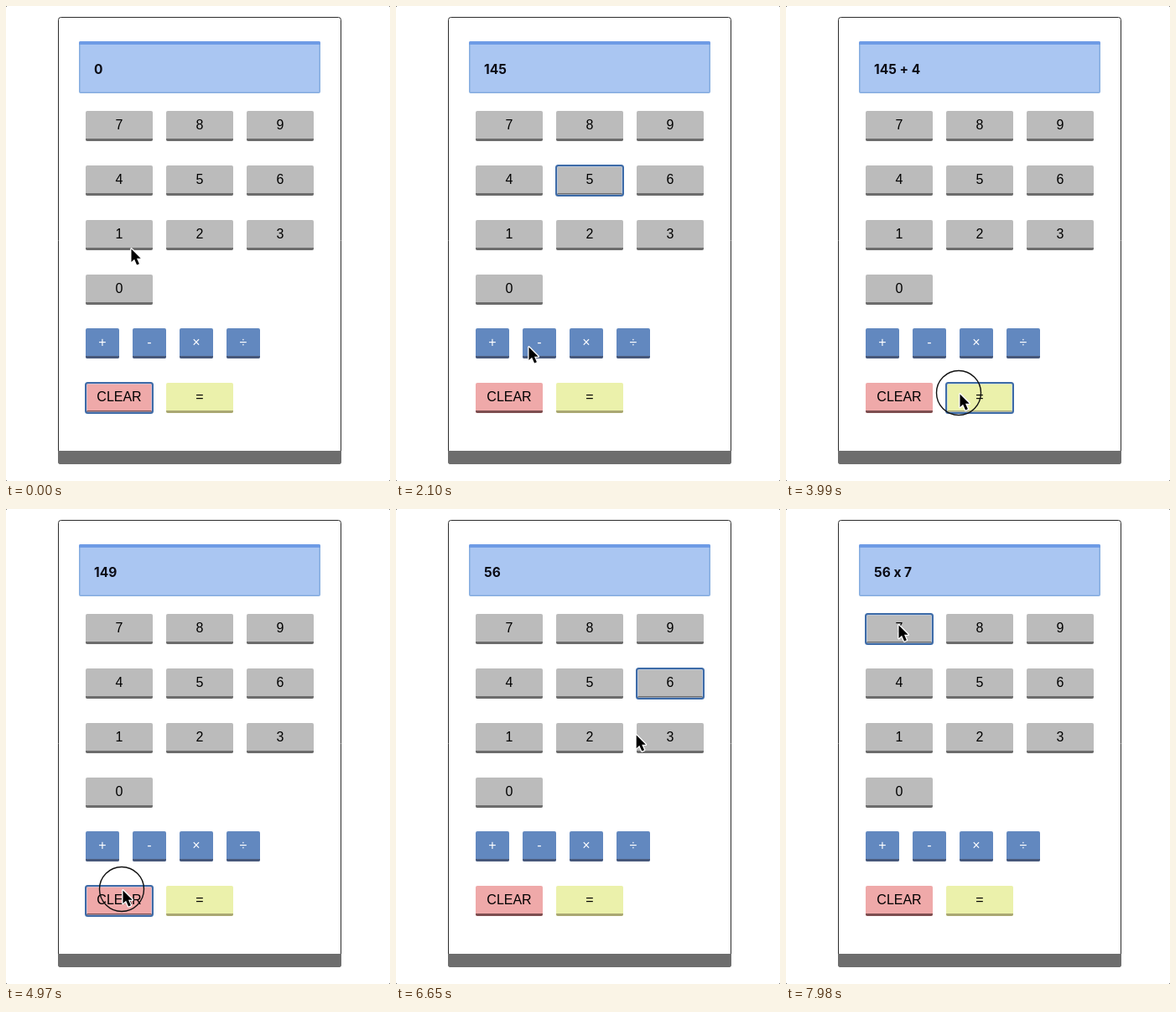
Animation of 458 by 566 pixels, one loop 8 s. Source, as an HTML page with a canvas:

```html
<!DOCTYPE html>
<html lang="en">
<head>
<meta charset="utf-8">
<title>Calculator</title>
<style>
  html, body { margin: 0; width: 100%; height: 100%; overflow: hidden; background: #fff; }
  canvas { display: block; width: 458px; height: 566px; }
</style>
</head>
<body>
<canvas id="stage"></canvas>
<script>
const W = 458, H = 566, LOOP = 8000, STEP = 70;
const HOLD = 140, REST = 70, SETTLE = 46;
const canvas = document.getElementById('stage');
const ctx = canvas.getContext('2d');
const ratio = window.devicePixelRatio || 1;
canvas.width = W * ratio;
canvas.height = H * ratio;

const keys = {};

function addKey(label, x, y, w, fill, edge, ink = '#000') {
  keys[label] = { label, x, y, w, h: 36, fill, edge, ink };
}

['789', '456', '123', '0'].forEach((row, r) => {
  [...row].forEach((d, c) => addKey(d, 95 + 96 * c, 125 + 65 * r, 80, '#bbb', '#6c6c6c'));
});
[...'+-×÷'].forEach((op, i) => addKey(op, 95 + 56 * i, 384, 40, '#6288bf', '#47587a', '#fff'));
addKey('CLEAR', 95, 449, 80, '#efa9a9', '#7d4e50');
addKey('=', 191, 449, 80, '#ebf1ab', '#aaa873');

// Stops of the pointer: key, time, offset from the key's centre
const visit = (label, at, dx, dy, click = true) => {
  const k = keys[label];
  return { label, at, click, x: k.x + k.w / 2 + dx, y: k.y + k.h / 2 + dy };
};
const visits = [
  visit('1', 210, 14, 15),
  visit('4', 700, 9, 2),
  visit('5', 1330, 25, 6),
  visit('-', 2100, -13, 3, false),
  visit('+', 2380, -6, 1),
  visit('4', 3150, 6, 4),
  visit('=', 3920, -24, -6),
  visit('CLEAR', 4900, 4, -14),
  visit('5', 5670, 6, 5),
  visit('6', 6230, -11, 4),
  visit('×', 7070, -12, 0),
  visit('7', 7770, -1, -6)
];

const leaveTime = v => v.click ? v.at + HOLD + REST : v.at;
const arriveTime = v => v.click ? v.at - SETTLE : v.at;

function pointerAt(t) {
  const i = visits.findIndex(v => t < arriveTime(v));
  const to = visits[i < 0 ? visits.length - 1 : i];
  const from = i > 0 ? visits[i - 1] : to;
  const begin = leaveTime(from);
  const u = Math.min(1, Math.max(0, (t - begin) / (arriveTime(to) - begin)));
  const s = u * u * (3 - 2 * u);
  return [from.x + (to.x - from.x) * s, from.y + (to.y - from.y) * s];
}

function evaluate(text) {
  const [a, op, b] = text.split(' ');
  const results = { '+': +a + +b, '-': a - b, x: a * b, '÷': a / b };
  return String(results[op]);
}

function enter(text, label) {
  if (label === 'CLEAR') return '0';
  if (label === '=') return evaluate(text);
  if ('+-×÷'.includes(label)) return `${text} ${label.replace('×', 'x')} `;
  return text === '0' ? label : text + label;
}

function stateAt(t) {
  const state = { text: '0', focus: 'CLEAR', pressed: false };
  for (const { label, at, click } of visits) {
    if (!click || t < at) continue;
    state.focus = label;
    state.pressed = t < at + HOLD;
    if (!state.pressed) state.text = enter(state.text, label);
  }
  return state;
}

function rect(x, y, w, h, fill) {
  ctx.fillStyle = fill;
  ctx.fillRect(x, y, w, h);
}

function roundPath(x, y, w, h, r) {
  ctx.beginPath();
  ctx.roundRect(x, y, w, h, r);
}

function strokeRound(x, y, w, h, r, color, width) {
  roundPath(x, y, w, h, r);
  ctx.strokeStyle = color;
  ctx.lineWidth = width;
  ctx.stroke();
}

function clipped(x, y, w, h, r, paint) {
  ctx.save();
  roundPath(x, y, w, h, r);
  ctx.clip();
  paint();
  ctx.restore();
}

function label(text, x, y, font, color, align) {
  ctx.font = font;
  ctx.fillStyle = color;
  ctx.textAlign = align;
  ctx.fillText(text, x, y);
}

function drawBody() {
  rect(0, 0, W, H, '#fff');
  for (const x of [0, W - 1]) for (const y of [0, H - 1]) rect(x, y, 1, 1, '#777');
  strokeRound(62.5, 13.5, 337, 532, 3, '#2b2b2b', 1);
  clipped(62, 13, 338, 533, 3, () => rect(62, 530, 338, 16, '#6d6d6d'));
}

function drawReadout(text) {
  clipped(87, 42, 288, 62, 2, () => {
    rect(87, 42, 288, 62, '#84acdf');
    rect(88.5, 46, 285, 56.5, '#aac6f2');
    rect(87, 42, 288, 4, '#6e9be5');
  });
  label(text, 105, 81, 'bold 15.5px Inter, sans-serif', '#0a0a14', 'left');
}

function drawKey(k, focused) {
  clipped(k.x, k.y, k.w, k.h, 2, () => {
    rect(k.x, k.y, k.w, k.h, k.fill);
    rect(k.x, k.y + k.h - 3, k.w, 3, k.edge);
  });
  label(k.label, k.x + k.w / 2, k.y + 22, '16px "Liberation Sans", Arial, sans-serif', k.ink, 'center');
  if (focused) {
    strokeRound(k.x + 1.5, k.y + 1.5, k.w - 3, k.h - 3, 1, 'rgba(190, 212, 245, 0.5)', 1);
    strokeRound(k.x, k.y, k.w, k.h, 2.5, '#3d6ba8', 2);
  }
}

const arrow = new Path2D('M0 0V15.6L3.6 12.3L6.6 19L9.4 17.8L6.5 11.2H11.2Z');

function drawPointer(x, y, pressed) {
  if (pressed) {
    ctx.beginPath();
    ctx.arc(x - 1, y, 26.5, 0, Math.PI * 2);
    ctx.strokeStyle = '#111';
    ctx.lineWidth = 1.4;
    ctx.stroke();
  }
  ctx.save();
  ctx.translate(x + 0.5, y + 1.5);
  ctx.lineJoin = 'round';
  ctx.lineWidth = 2.6;
  ctx.strokeStyle = '#fff';
  ctx.stroke(arrow);
  ctx.fillStyle = '#000';
  ctx.fill(arrow);
  ctx.restore();
}

function draw(t) {
  const { text, focus, pressed } = stateAt(t);
  ctx.setTransform(ratio, 0, 0, ratio, 0, 0);
  drawBody();
  drawReadout(text);
  for (const k of Object.values(keys)) drawKey(k, k.label === focus);
  drawPointer(...pointerAt(t), pressed);
}

const start = performance.now();
function tick() {
  const t = (performance.now() - start) % LOOP;
  draw(Math.floor(t / STEP) * STEP);
  requestAnimationFrame(tick);
}
tick();
</script>
</body>
</html>
```
